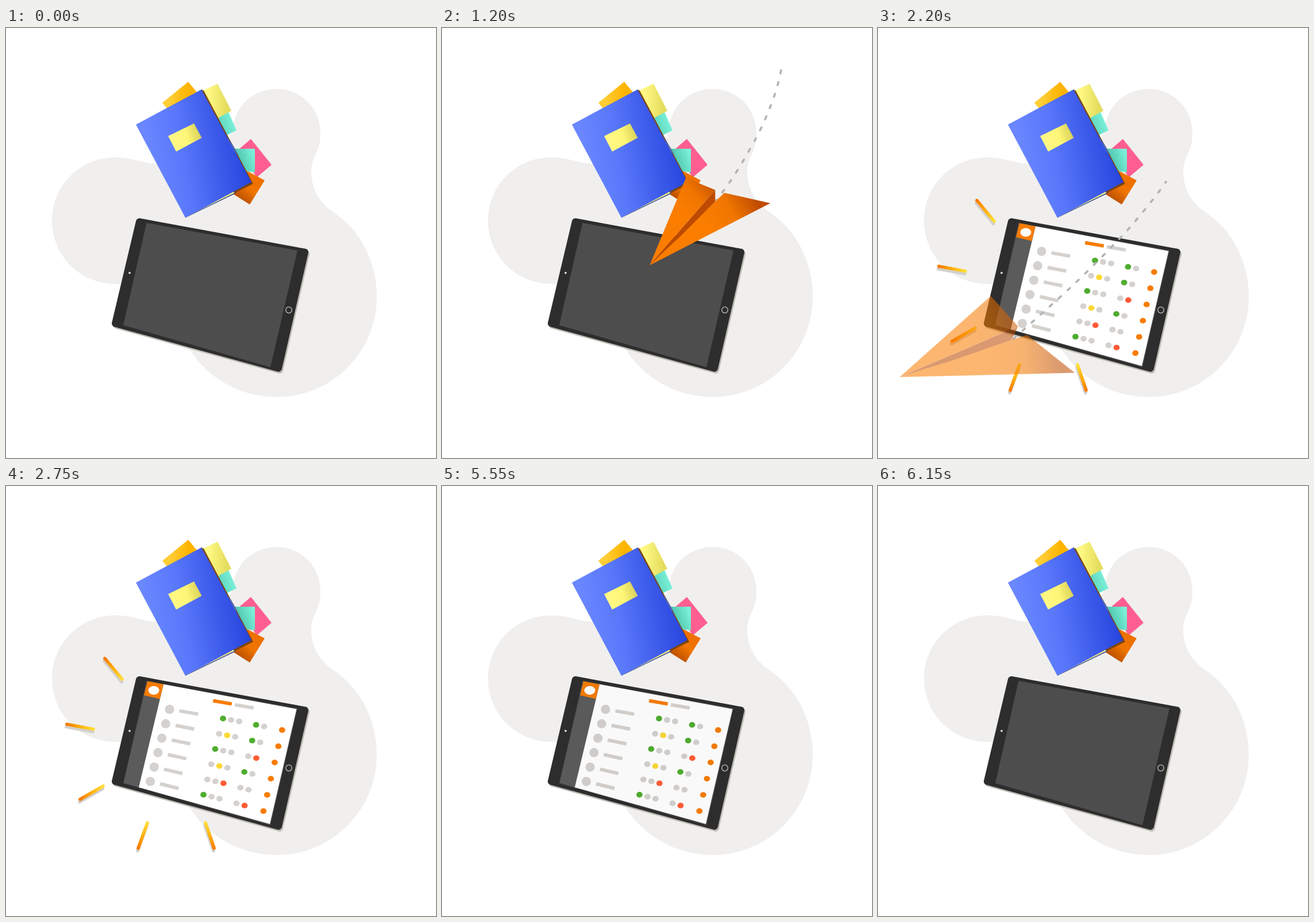
An HTML page that plays this animation: 748x748 px, repeating every 7.05 s.

```html
<!DOCTYPE html>
<html lang="en">
<head>
<meta charset="utf-8">
<title>Paper plane and tablet</title>
<style>
html, body { margin: 0; width: 100%; height: 100%; overflow: hidden; background: #fff; }
svg { display: block; width: 100vw; height: 100vh; }
</style>
</head>
<body>
<svg id="stage" viewBox="0 0 748 748" xmlns="http://www.w3.org/2000/svg">
  <defs id="defs">
    <mask id="reveal" maskUnits="userSpaceOnUse" x="0" y="0" width="748" height="748">
      <path id="window" fill="none" stroke="#fff" stroke-width="14"/>
    </mask>
  </defs>
  <path fill="#f0efee" d="M190 225C222 225 232 235 262 236C340 236 391 215 395 170C402 130 435 106 471 106C513 106 547 140 547 183C547 218 531 222 531 250C531 282 548 306 569 320C615 350 645 405 645 467C645 564 567 642 471 642C405 642 349 606 320 560L250 450L190 445C129 445 80 396 80 335C80 274 129 225 190 225Z"/>
  <g id="book"></g>
  <g id="rays"></g>
  <g stroke-width="12" stroke-linejoin="round">
    <path fill="#bfbab4" stroke="#bfbab4" d="M234 340L522 393L476 595L192 517Z"/>
    <path fill="#2d2d2d" stroke="#2d2d2d" d="M232 337L520 390L474 592L190 514Z"/>
  </g>
  <path fill="#4d4d4d" d="M244.500 339L507 387L460 590L204 517Z"/>
  <circle cx="215" cy="426" r="1.800" fill="#fff"/>
  <circle cx="492" cy="490.500" r="5.300" fill="none" stroke="#c9c7c5" stroke-width="1.200"/>
  <g id="screen"></g>
  <g mask="url(#reveal)">
    <path id="trail" fill="none" stroke="#b3b3b3" stroke-width="3.600" stroke-linecap="round"
      stroke-dasharray="5.500 15.600" stroke-dashoffset="-17"/>
  </g>
  <g id="plane"></g>
</svg>
<script>
const LOOP = 7050, STEP = 50;
const $ = id => document.getElementById(id);
const clamp = v => Math.max(0, Math.min(1, v));
const ramp = (t, a, b) => clamp((t - a) / (b - a));
const mix = (a, b, k) => a + (b - a) * k;

function add(parent, tag, attrs) {
  const el = document.createElementNS("http://www.w3.org/2000/svg", tag);
  for (const k in attrs) el.setAttribute(k, attrs[k]);
  return parent.appendChild(el);
}

let gradients = 0;
function gradient(x1, y1, x2, y2, ...colors) {
  const id = "g" + gradients++;
  const g = add($("defs"), "linearGradient", { id, x1, y1, x2, y2, gradientUnits: "userSpaceOnUse" });
  colors.forEach((c, i) => add(g, "stop", { offset: i / (colors.length - 1), "stop-color": c }));
  return `url(#${id})`;
}

const poly = (parent, points, fill) => add(parent, "polygon", { points, fill });

function drawBook() {
  const b = $("book");
  poly(b, "272,130 317,93.500 334,114 280,140", gradient(285, 120, 318, 120, "#ffcd35", "#fdb400"));
  poly(b, "405,211 426,193 462,238 436,260", "#ff5f90");
  poly(b, "416,247 450,265 424,307 394,288", gradient(440, 258, 405, 298, "#ee6f00", "#f07500", "#b94f00"));
  poly(b, "396,210 433,210 433,251 416,249", gradient(405, 235, 433, 225, "#4fc4ad", "#7bf0d9"));
  poly(b, "367,157 387,146 401,178 381,188", gradient(372, 170, 395, 162, "#5fd6bf", "#7bf0d9"));
  poly(b, "342,109 368,97 392,144 368,157", gradient(352, 125, 385, 125, "#fff984", "#e3dc5c"));
  poly(b, "340,107 344,109 430,271 312,330", "#7c4410");
  poly(b, "386,189 399,211 405,223 395,211", "#5063a8");
  poly(b, "384,189 400,218 396,216", "#f4ee76");
  poly(b, "312,330 396,285 399,288", "#3c4f9c");
  poly(b, "318,326 395,284 397,287", "#fff87c");
  poly(b, "226,168 340,107 427,268 312,330", gradient(250, 235, 425, 205, "#6a87ff", "#5877fa", "#3d5bea", "#2341da"));
  poly(b, "282,188 327,166 340.500,191 296,215", gradient(290, 195, 338, 180, "#fff984", "#fdf677", "#d8d05a"));
}

function drawScreen() {
  const s = $("screen");
  const pale = "#d4d1ce", orange = "#f77c00";
  const hue = { g: "#4fad2f", y: "#fdd836", r: "#ff5b35", o: orange, ".": pale };
  const dot = (cx, cy, c) => add(s, "ellipse", { cx, cy, rx: 5.4, ry: 4.9, fill: hue[c] });
  const bar = (x, y, turn, fill) => add(s, "rect", {
    x: -16.500, y: -3, width: 33, height: 6, fill, transform: `translate(${x} ${y}) rotate(${turn})`
  });
  poly(s, "272,344.500 505.500,388 459,588 230,524", "#fff");
  poly(s, "246,339.500 274,345 231,524 204.500,516.500", "#5b5b5b");
  poly(s, "246,339.500 274,345 267.500,370.500 240,364", orange);
  add(s, "ellipse", { cx: 257, cy: 355.5, rx: 9.5, ry: 7.6, fill: "#fff" });
  bar(376.5, 376.3, 10, orange);
  bar(414.5, 383.3, 10, pale);
  ["g.. g.", ".y. g.", "g.. .r", ".y. g.", "..r ..", "g.. .r"].forEach((row, i) => {
    const [left, right] = row.split(" ");
    const rise = 2.5 + 0.2 * i;
    add(s, "circle", { cx: 284.5 - 6.7 * i, cy: 388.5 + 25.1 * i, r: 8, fill: pale });
    bar(318 - 6.8 * i, 394 + 25.6 * i, 10 + 0.8 * i, pale);
    [...left].forEach((c, k) => dot(377.5 - 6.8 * i + 14 * k, 404.5 + 26.5 * i + rise * k, c));
    [...right].forEach((c, k) => dot(435 - 6.8 * i + 14 * k, 415.5 + 27.3 * i + (rise + 0.4) * k, c));
    dot(480.3 - 6.5 * i, 424.5 + 28.2 * i, "o");
  });
}

// The plane's local origin is the notch that rides on the trail.
function drawPlane() {
  const p = $("plane");
  poly(p, "-115,112 -52,-40 -1,-19", gradient(-60, 15, -8, -32, "#fa7d00", "#f07600", "#c85400"));
  poly(p, "-115,112 0,0 15,-14 95,4", gradient(-20, 30, 62, -16, "#fa7d00", "#f07600", "#c04c00"));
  poly(p, "-115,112 -1,-19 -1,1 -62,62 -88,86", "#bd4a00");
}

// Inner end, then outer end.
const rays = [
  [202, 336, 172, 300], [152, 423, 106, 414.5], [169, 522, 129, 545],
  [246, 586, 230, 630], [347, 586, 362, 630]
].map(ends => ({ ends }));

function drawRays() {
  const line = (stroke, transform) => add($("rays"), "line", {
    stroke, transform, "stroke-width": 5.8, "stroke-linecap": "round"
  });
  for (const r of rays) r.shade = line("#d3d0cd", "translate(-1 4.500)");
  for (const r of rays) {
    const [x1, y1, x2, y2] = r.ends;
    r.beam = line(gradient(x1, y1, x2, y2, "#ffdf3c", "#ffb010", "#f77c00"), "");
  }
}

function smoothPath(pts) {
  const at = i => pts[Math.max(0, Math.min(pts.length - 1, i))];
  let d = `M${pts[0]}`;
  for (let i = 0; i < pts.length - 1; i++) {
    const [a, b, c, e] = [at(i - 1), at(i), at(i + 1), at(i + 2)];
    const c1 = b.map((v, k) => v + (c[k] - a[k]) / 6);
    const c2 = c.map((v, k) => v - (e[k] - b[k]) / 6);
    d += `C${c1} ${c2} ${c}`;
  }
  return d;
}

const route = smoothPath([
  [593, 57], [585, 95], [571, 137], [547, 190], [502, 266],
  [450, 333], [407, 380], [347, 440], [280, 501], [200, 572]
]);

// Time and distance flown along the route.
const flight = [[550, 0], [1200, 273], [1700, 463], [2000, 554], [2350, 661]];
function distance(t) {
  for (let i = 1; i < flight.length; i++) {
    const [t0, s0] = flight[i - 1], [t1, s1] = flight[i];
    if (t <= t1) return mix(s0, s1, ramp(t, t0, t1));
  }
  return flight[flight.length - 1][1];
}

function render(t) {
  const s = distance(t), trail = $("trail"), plane = $("plane");

  const flying = ramp(t, 480, 680) * (1 - ramp(t, 2080, 2350));
  const place = trail.getPointAtLength(s);
  const turn = (t - 1200) / 500;
  plane.style.opacity = t < 550 ? 0 : flying;
  plane.setAttribute("transform",
    `translate(${place.x} ${place.y}) rotate(${12.9 * turn}) scale(${Math.max(0.1, 1 + 0.145 * turn)})`);

  const tail = mix(10, 670, ramp(t, 1925, 2750));
  trail.style.display = s > tail ? "" : "none";
  $("window").setAttribute("stroke-dasharray", `0 ${tail} ${Math.max(0.01, s - tail)} 3000`);

  $("screen").style.opacity = ramp(t, 1260, 1650) * (1 - ramp(t, 5530, 6150));

  const grown = ramp(t, 1400, 2000), gone = ramp(t, 4050, 4950);
  for (const { ends: [x1, y1, x2, y2], shade, beam } of rays) {
    for (const el of [shade, beam]) {
      el.style.display = grown > gone ? "" : "none";
      el.setAttribute("x1", mix(x1, x2, gone));
      el.setAttribute("y1", mix(y1, y2, gone));
      el.setAttribute("x2", mix(x1, x2, grown));
      el.setAttribute("y2", mix(y1, y2, grown));
    }
  }
}

drawBook();
drawScreen();
drawPlane();
drawRays();
$("trail").setAttribute("d", route);
$("window").setAttribute("d", route);

const start = performance.now();
function tick() {
  const t = (performance.now() - start) % LOOP;
  render(Math.floor(t / STEP) * STEP);
  requestAnimationFrame(tick);
}
tick();
</script>
</body>
</html>
```
